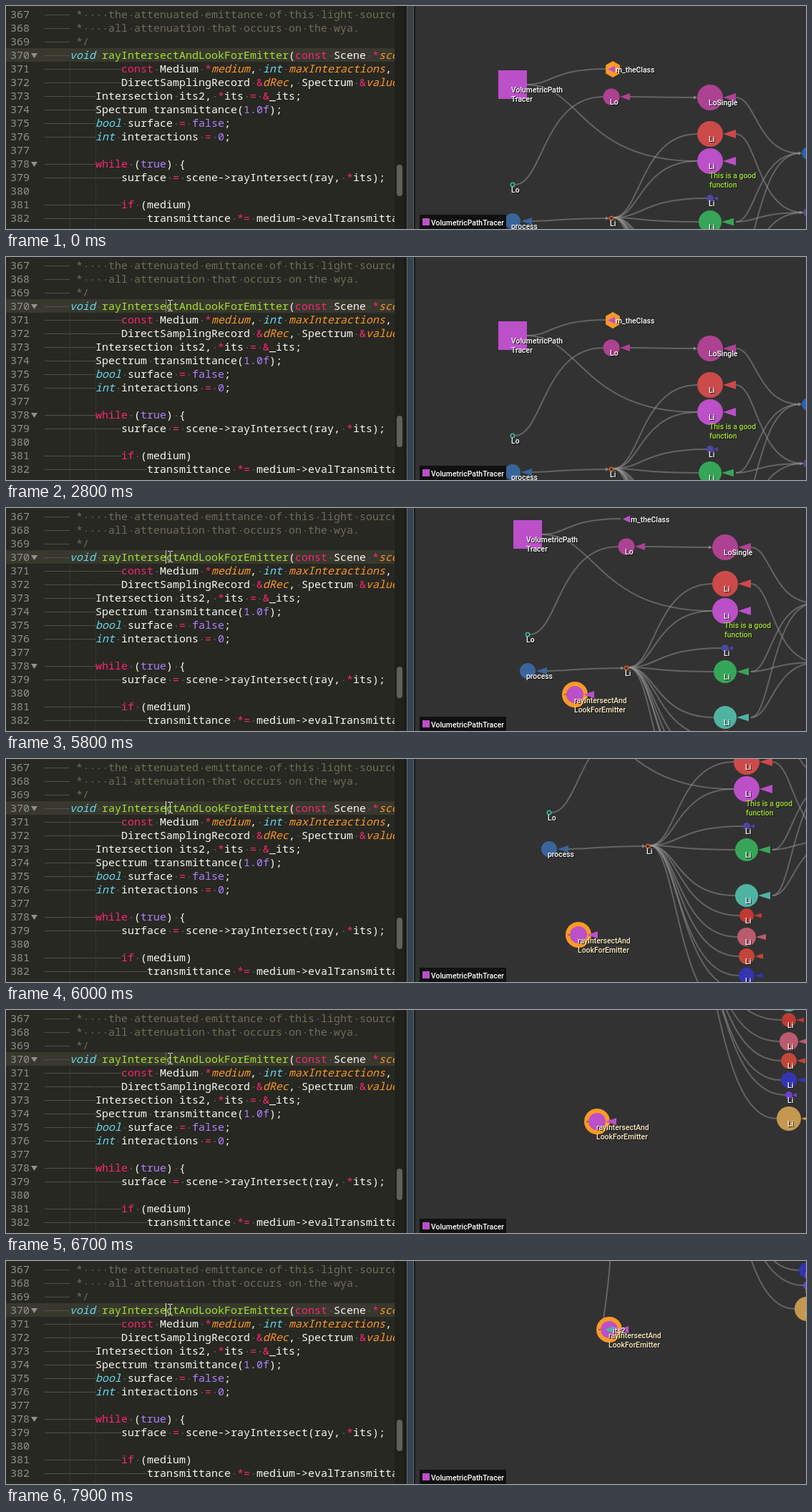
Recreate the animation shown at these times as an HTML page with a canvas. Size 1118 by 312 pixels, loop 8 s.

```html
<!DOCTYPE html>
<html lang="en">
<head>
<meta charset="utf-8">
<title>Code and call graph</title>
<style>
html, body { margin: 0; height: 100%; overflow: hidden; background: #323232; }
canvas { display: block; }
</style>
</head>
<body>
<canvas id="stage" width="1118" height="312"></canvas>
<script>
const ctx = document.getElementById('stage').getContext('2d');
const LOOP = 8;
const CODE_FONT = "15px 'Noto Sans Mono', monospace";
const LABEL_FONT = "500 10.4px Roboto, sans-serif";
const EDGE_COLOR = 'rgba(150,150,150,.5)';
const MAGENTA = '#bb50c8', ORANGE = '#ff9a26', PLUM = '#ae4292';
const WHITE = '#f8f8f2', PINK = '#f92672', CYAN = '#66d9ef', VIOLET = '#ae81ff';
const GREEN = '#a6e22e', PARAM = '#fd971f', COMMENT = '#706c59';

// Each line: tab count, text
const FIRST_LINE = 367;
const code = [
  [1, ' *    the attenuated emittance of this light source'],
  [1, ' *    all attenuation that occurs on the wya.'],
  [1, ' */'],
  [1, 'void rayIntersectAndLookForEmitter(const Scene *scene'],
  [3, 'const Medium *medium, int maxInteractions, '],
  [3, 'DirectSamplingRecord &dRec, Spectrum &value'],
  [2, 'Intersection its2, *its = &_its;'],
  [2, 'Spectrum transmittance(1.0f);'],
  [2, 'bool surface = false;'],
  [2, 'int interactions = 0;'],
  [0, ''],
  [2, 'while (true) {'],
  [3, 'surface = scene->rayIntersect(ray, *its);'],
  [0, ''],
  [3, 'if (medium)'],
  [4, 'transmittance *= medium->evalTransmittance']
];

function tokenStyle(token, row) {
  if (row < 3) return COMMENT;
  if (/^(const|while|if|[=*&]+)$/.test(token)) return PINK;
  if (/^(void|int|bool)$/.test(token)) return CYAN;
  if (/^(true|false|\d.*)$/.test(token)) return VIOLET;
  if (row === 3 && token.startsWith('ray')) return GREEN;
  if (row < 6 && /^(scene|medium|maxInteractions|dRec|value)$/.test(token)) return PARAM;
  return WHITE;
}

function rect(x, y, w, h, color) {
  ctx.fillStyle = color;
  ctx.fillRect(x, y, w, h);
}

function polygon(color, ...points) {
  ctx.fillStyle = color;
  ctx.beginPath();
  for (const [x, y] of points) ctx.lineTo(x, y);
  ctx.fill();
}

function disc(x, y, r, color) {
  ctx.fillStyle = color;
  ctx.beginPath();
  ctx.arc(x, y, r, 0, 7);
  ctx.fill();
}

function ring(x, y, color) {
  disc(x, y, 3.5, color);
  disc(x, y, 1.7, '#282828');
}

// Triangle whose tip points left at (x, y)
function arrow(x, y, w, h, color) {
  polygon(color, [x, y], [x + w, y - h], [x + w, y + h]);
}

function label(text, x, y, color = '#fff') {
  ctx.font = LABEL_FONT;
  text.split('\n').forEach((line, i) => {
    ctx.fillStyle = '#111';
    ctx.fillText(line, x + 1, y + 1 + 13 * i);
    ctx.fillStyle = color;
    ctx.fillText(line, x, y + 13 * i);
  });
}

// Most of the rise happens in the first third, then the edge levels out
function edge(x1, y1, x2, y2) {
  const bend = x1 + (x2 - x1) * 0.32;
  ctx.beginPath();
  ctx.moveTo(x1, y1);
  ctx.bezierCurveTo(bend, y1, bend, y2, x2, y2);
  ctx.stroke();
}

function drawEditor() {
  rect(0, 0, 556, 312, '#272822');
  rect(0, 59, 543, 19, '#38382e');
  ctx.save();
  ctx.beginPath();
  ctx.rect(0, 0, 543, 312);
  ctx.clip();
  for (const x of [89, 125])
    for (let y = x === 89 ? 80 : 137; y < 312; y += 2) rect(x, y, 1, 1, '#42433a');
  code.forEach(([tabs, text], row) => {
    const y = 12 + 19 * row;
    ctx.font = CODE_FONT;
    ctx.fillStyle = '#8f908a';
    ctx.fillText(FIRST_LINE + row, 6, y + 5);
    for (let i = 0; i < tabs; i++) rect(54 + 36 * i, y, 35, 1, '#515146');
    const left = 53 + 36 * tabs;
    for (const { 0: token, index } of text.matchAll(/\d[\w.]*|\w+|[=*&]+|\S| /g)) {
      const x = left + 9 * index;
      if (token === ' ') {
        if (index) rect(x + 4, y, 2, 2, '#504f45');
        continue;
      }
      const color = tokenStyle(token, row);
      ctx.font = (color === CYAN || color === PARAM ? 'italic ' : '') + CODE_FONT;
      ctx.fillStyle = color;
      ctx.fillText(token, x, y + 5);
    }
  });
  for (const y of [69, 221]) polygon('#90918a', [35, y - 3], [44, y - 3], [39.5, y + 4]);
  ctx.restore();
  rect(543, 0, 13, 312, '#20211c');
  ctx.fillStyle = '#5f605b';
  ctx.beginPath();
  ctx.roundRect(546, 222, 8, 44, 4);
  ctx.fill();
}

function drawDivider(active) {
  rect(556, 0, 22, 312, '#323232');
  rect(556, 0, 4, 312, '#1b1c19');
  rect(560, 0, 10, 312, active ? '#38424d' : '#3c3f43');
  for (const x of [560, 569]) rect(x, 0, 1, 312, active ? '#5b6a79' : '#55585c');
  rect(570, 0, 2, 312, '#1a1a1a');
}

// Function nodes in the callee column: y, radius, color
const callees = [
  [179, 18, '#cc4a49'], [217, 18, MAGENTA], [269, 5, '#4f45a2'], [302, 16, '#37a558'],
  [366, 16, '#4fb3a2'], [394, 10, '#bf3a32'], [424, 13, '#ba5c70'], [451, 11, '#c24639'],
  [478, 11, '#3434b2'], [499, 5, '#703fd2'], [532, 17, '#c4984e']
];

function drawGraph(selecting) {
  ctx.strokeStyle = EDGE_COLOR;
  ctx.lineWidth = 2;
  edge(728, 110, 838, 88);
  edge(728, 110, 966, 217);
  edge(711, 250, 835, 127);
  edge(872, 127, 964, 128);
  edge(735, 301, 842, 297);
  for (const [y, r] of callees) edge(849, 296, 984 - r, y);
  edge(1020, 128, 1110, 206);
  edge(1020, 179, 1114, 289);
  for (const y of [302, 366]) {
    edge(1020, y, 1110, 206);
    edge(1020, y, 1114, 289);
  }
  for (const [x, y] of [[966, 128], [843, 297], [1112, 206], [1114, 289]])
    arrow(x, y, -5, 2.5, '#8a8a8a');

  rect(688, 90, 40, 40, MAGENTA);
  label('VolumetricPath\nTracer', 706, 121);
  if (!selecting) {
    const hexagon = Array.from({ length: 6 }, (_, i) => {
      const a = Math.PI * (i / 3 + 1 / 6);
      return [848 + 11.5 * Math.cos(a), 88.5 + 11.5 * Math.sin(a)];
    });
    polygon(ORANGE, ...hexagon);
  }
  arrow(841, 88.5, 10, 5, MAGENTA);
  label('m_theClass', 852, 93);

  disc(846, 127, 11.5, PLUM);
  arrow(858, 127, 14, 5, PLUM);
  label('Lo', 844, 138);
  disc(984, 128, 18, PLUM);
  arrow(1002, 128, 18, 6, PLUM);
  label('LoSingle', 982, 139);

  for (const [y, r, color] of callees) {
    disc(984, y, r, color);
    arrow(984 + r, y, Math.min(18, r + 1), Math.max(3, r / 3), color);
    label('Li', 982, y + 11);
  }
  label('This is a good\nfunction', 983, 241, GREEN);

  ring(708, 250, '#3fae94');
  label('Lo', 706, 261);
  disc(708, 301, 11, '#3a659b');
  arrow(720, 301, 15, 5, '#3a659b');
  label('process', 706, 312);
  ring(846, 297, '#c45d24');
  label('Li', 844, 308);
  disc(1121, 206, 9, '#2b62b0');
  disc(1120, 289, 6, '#604090');
}

// Distance the camera still has to cover, as exponential decay between keys
const TRAVEL = 474;
const cameraKeys = [[5.68, TRAVEL], [5.8, 402], [6.3, 193], [7.1, 46], [7.9, 9], [8, 7]];

function cameraShift(t) {
  if (t <= cameraKeys[0][0]) return 0;
  const i = Math.max(1, cameraKeys.findIndex(([time]) => time >= t));
  const [t0, d0] = cameraKeys[i - 1], [t1, d1] = cameraKeys[i];
  return TRAVEL - d0 * (d1 / d0) ** ((t - t0) / (t1 - t0));
}

function drawSelection(t) {
  const left = 229 * Math.exp(-2.4 * (t - 5.8));
  const x = Math.round(708 + 0.288 * left), y = Math.round(562 - left);
  const showVariable = t >= 7.6;
  if (showVariable) {
    ctx.strokeStyle = EDGE_COLOR;
    ctx.beginPath();
    ctx.moveTo(x + 2, y - 110);
    ctx.bezierCurveTo(x, y - 66, x - 5, y - 38, x - 8, y - 14);
    ctx.stroke();
  }
  disc(x, y, 18, ORANGE);
  disc(x, y, 12, MAGENTA);
  rect(x - 15, y - 1, 3, 2, '#a5651d');
  arrow(x + 12, y, 15, 5, MAGENTA);
  if (showVariable) {
    arrow(x - 6, y, 11, 5, '#4fb3a2');
    label('its2', x + 5, y + 5);
  }
  label('rayIntersectAnd\nLookForEmitter', x - 1, y + 12, '#ffedc0');
}

function drawLegend() {
  rect(577, 292, 122, 20, '#101010');
  rect(582, 297, 10, 10, MAGENTA);
  label('VolumetricPathTracer', 594, 307);
}

const clamp = v => Math.min(1, Math.max(0, v));

function drawCaret(t) {
  if (t < 0.8) return;
  const phase = ((t - 1.76) / 0.98 % 1 + 1) % 1 * 0.98;
  const alpha = clamp(phase / 0.15) - clamp((phase - 0.45) / 0.15);
  rect(223, 59, 1, 19, `rgba(248,248,240,${alpha})`);
}

function drawPointer(t) {
  if (t < 0.1) return;
  const rest = (1 - clamp((t - 0.1) / 0.7)) ** 2;
  const x = Math.round(229 + 300 * rest), y = Math.round(60 + 260 * rest);
  rect(x, y + 1, 1, 14, '#ddd');
  for (const end of [y, y + 15]) {
    rect(x - 3, end, 3, 1, '#ddd');
    rect(x + 1, end, 3, 1, '#ddd');
  }
}

function draw(t) {
  const shift = cameraShift(t), selecting = t >= 5.6;
  rect(556, 0, 562, 312, '#323232');
  ctx.save();
  ctx.translate(Math.round(shift * 0.29), -Math.round(shift));
  drawGraph(selecting);
  if (selecting) drawSelection(t);
  ctx.restore();
  drawLegend();
  drawEditor();
  drawDivider(t >= 0.5);
  drawCaret(t);
  drawPointer(t);
}

const start = performance.now();
function tick() {
  draw((performance.now() - start) / 1000 % LOOP);
  requestAnimationFrame(tick);
}
tick();
</script>
</body>
</html>
```
